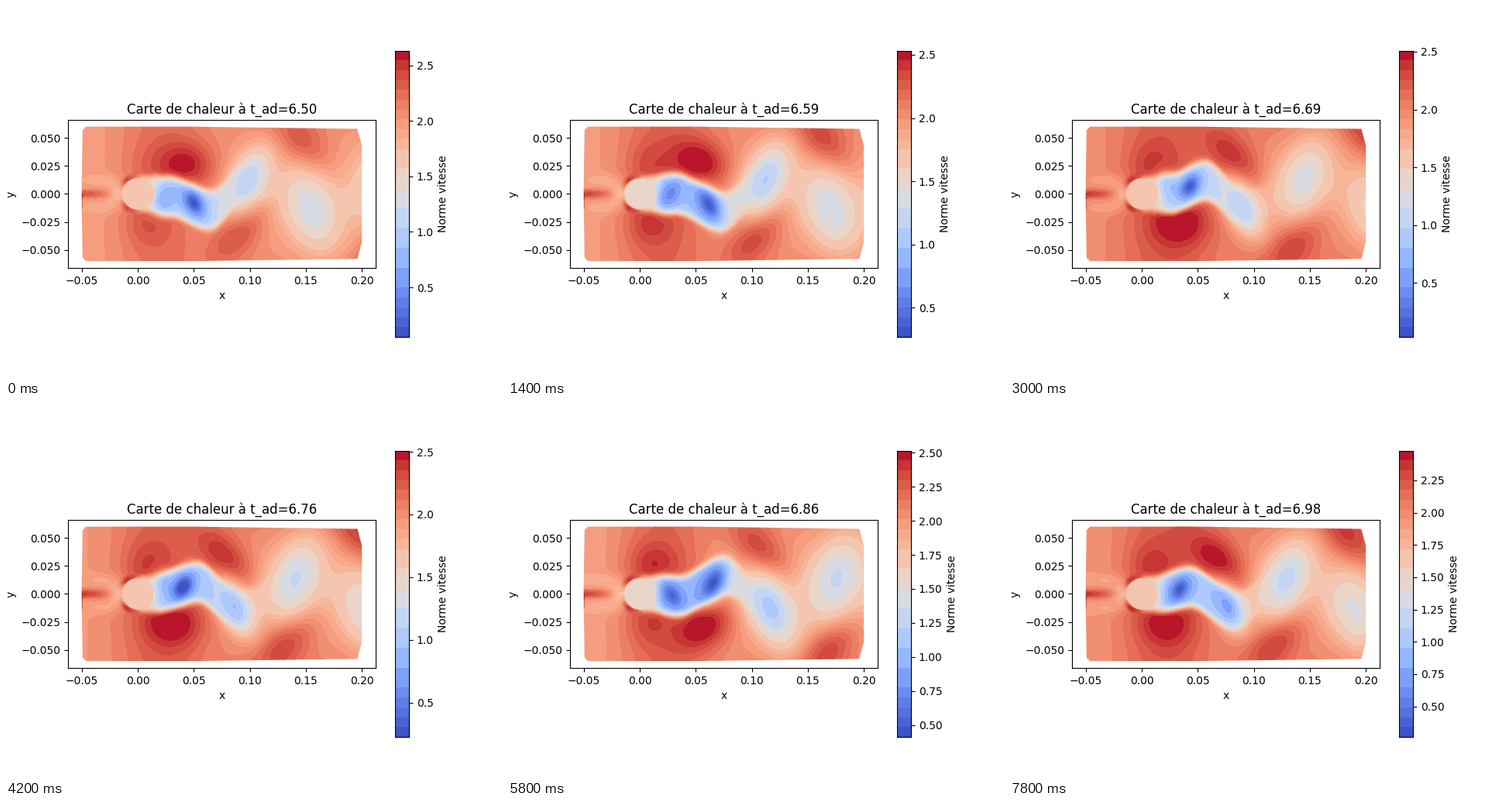
Write a matplotlib script that moves like this. It is 640 px wide and 480 px high and loops after 8000 ms.

```python
import numpy as np
import matplotlib.pyplot as plt
from matplotlib.animation import FuncAnimation
from matplotlib.path import Path

FRAMES, INTERVAL = 40, 200
SHEDDING = 0.161          # vortex cycles per frame
BANDS = 29
XLIM, YLIM = (-.0623, .2122), (-.066, .066)

# Colour limits at a few moments of the shedding cycle
CYCLE = [0, .127, .28, .38, .415, .635, .67]
VMIN = [.052, .269, .262, .231, .033, .402, .411]
VMAX = [2.632, 2.533, 2.479, 2.509, 2.509, 2.579, 2.514]

X, Y = np.meshgrid(np.linspace(-.0505, .2005, 363), np.linspace(-.0607, .0607, 177))
R, THETA = np.hypot(X, Y), np.degrees(np.arctan2(np.abs(Y), X))


def bump(u, v=0):
    return np.exp(-u**2 - v**2)


def ramp(x, lo, hi):
    s = np.clip((x - lo) / (hi - lo), 0, 1)
    return s * s * (3 - 2 * s)


def band_color(i):
    """Reds and deep blues step band by band, pale tones in pairs."""
    mid = (i - 5) // 2 * 2 + 6 if 5 <= i < 19 else i + .5
    return plt.cm.coolwarm(mid / BANDS)


def ambient():
    v = 1.92 + .30 * bump((X - .023) / .047)
    v += ramp(X, .05, .11) * (.12 * (Y / .06)**2 - .09 * bump(Y / .025))
    v -= .14 * bump((X + .030) / .016, (np.abs(Y) - .0125) / .006)
    v -= .35 * bump((X + .017) / .010, Y / .009)
    v += .42 * bump(Y / .0037) * np.clip((-.015 - X) / .032, 0, 1)
    v += .30 * ((X < -.0492) & (Y < 0) & (Y > -.013))
    v += .35 * bump((R - .0160) / .0024, (THETA - 130) / 22)
    return v


AMBIENT = ambient()


def vortices(phase):
    """Age in cycles and side (+1 above, -1 below) of each vortex, youngest first."""
    first = int(np.floor(phase * 2))
    return [(phase - n / 2, 1 if n % 2 else -1) for n in range(first + 3, first - 4, -1)]


def slow_center(age):
    x = .05 + .09 * age + (.08 if age < 0 else .015) * age**2
    return x, .015 - .007 * np.exp(-2 * age)


def wake_center(cores):
    """Meandering line through the slow cores, swinging wide past the young ones."""
    pts = [(-.02, 0), (.012, 0)]
    for age, side in cores:
        if age > -.6:
            x, y = slow_center(age)
            swing = bump(age / .3)
            pts.append((x + .015 * swing, side * y * (1 + .8 * swing) * ramp(age, -.6, -.4)))
    x, yc = X[0], np.zeros(X.shape[1])
    for (x0, y0), (x1, y1) in zip(pts, pts[1:]):
        part = (x >= x0) & (x < x1)
        yc[part] = y0 + (y1 - y0) * ramp(x[part], x0, x1)
    return yc


def add_fast(v, age, side):
    dx = X - max(.011, .04 + .086 * age + .02 * age**2)
    dy = -side * Y - (.026 + .021 * max(age, 0)) + .6 * ramp(age, 0, .4) * dx
    top = 2.38 + .24 * bump(age / .3)
    rx = .019 + .007 * ramp(age, -.5, 0)
    ry = .021 + .004 * np.clip(age, 0, 1)
    return v + np.maximum(top - v, 0) * bump(dx / rx, dy / ry) * ramp(age, -1.1, -.8)


def add_wake(v, cores):
    x = X[0]
    width = .0157 + .0025 * ramp(x, 0, .03) - .002 * ramp(x, .06, .1)
    level = 1.42 - .42 * ramp(x, .010, .024) + .4 * ramp(x, .05, .1)
    power = ramp(x, -.004, .004) * (1 - ramp(x, .06, .13))
    off = np.abs(Y - wake_center(cores)) / width
    return v + (level - v) * power * np.exp(-off**6)


def add_slow(v, age, side):
    x, y = slow_center(age)
    low = .88 + .38 * age - .8 * bump((age + .02) / .28)
    a = .009 + .015 * ramp(age, 0, 1.1)
    b = .013 + .024 * ramp(age, -.1, .9)
    tilt = np.radians(58 + 12 * np.clip(age, 0, 1))
    c, s = np.cos(tilt), np.sin(tilt)
    dx, dy = X - x, side * Y - y
    pull = bump((dx * c + dy * s) / b, (dy * c - dx * s) / a)
    return v + (low - v) * pull * ramp(age, -.72, -.45)


def speed(phase):
    cores = vortices(phase)
    v = AMBIENT
    for age, side in cores:
        v = add_fast(v, age, side)
    v = add_wake(v, cores)
    for age, side in cores:
        v = add_slow(v, age, side)
    return v + (1.59 - v) * (1 - ramp(R, .0136, .0150))


palette = [band_color(i) for i in range(BANDS)]
levels = np.linspace(0, 1, BANDS + 1)

fig = plt.figure(figsize=(6.4, 4.8), dpi=100)
ax = fig.add_axes([.125, .11, .62, .77])
ax.set_aspect("equal")
ax.set(xlim=XLIM, ylim=YLIM, xlabel="x", ylabel="y")
title = ax.set_title("")

half = np.array([(-.05, .013), (-.0493, .057), (-.0462, .06), (.05, .06),
                 (.196, .058), (.2, .043)])
domain = Path(np.vstack([half, half[::-1] * (1, -1), half[:1]]))

cax = fig.add_axes([.78375, .11, .77 * 4.8 / 6.4 / 20, .77])
bar = cax.imshow(np.array(palette)[:, None, :], origin="lower", aspect="auto",
                 interpolation="nearest", extent=(0, 1, 0, 1))
cax.set_xticks([])
cax.yaxis.tick_right()
cax.yaxis.set_label_position("right")
cax.set_ylabel("Norme vitesse")

drawn = []


def update(k):
    while drawn:
        drawn.pop().remove()
    phase = SHEDDING * k
    lo, hi = (np.interp(phase, CYCLE, lim, period=1) for lim in (VMIN, VMAX))
    z = np.clip((speed(phase) - lo) / (hi - lo), 1e-6, 1 - 1e-6)
    cs = ax.contourf(X, Y, z, levels=levels, colors=palette)
    cs.set_clip_path(domain, ax.transData)
    drawn.append(cs)
    ax.set(xlim=XLIM, ylim=YLIM)
    bar.set_extent((0, 1, lo, hi))
    cax.set_ylim(lo, hi)
    title.set_text(f"Carte de chaleur à t_ad={6.5 + .0124 * k:.2f}")
    return cs, bar, title


anim = FuncAnimation(fig, update, frames=FRAMES, interval=INTERVAL,
                     repeat=True, repeat_delay=0, blit=False)
plt.show()
```
